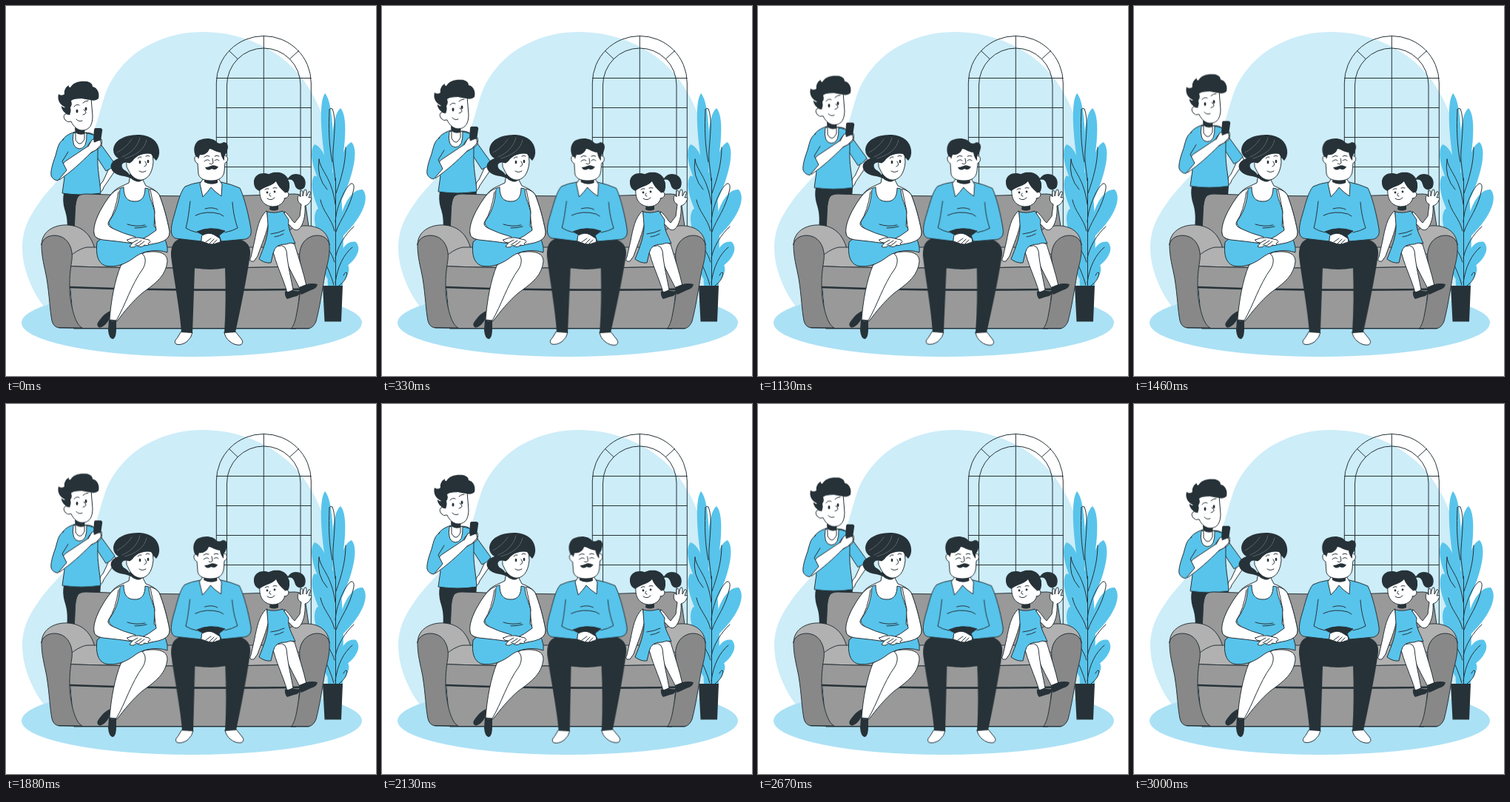
Write an HTML page that moves like this. It is 500 px wide and 500 px high and loops after 3.04 s.

```html
<!DOCTYPE html>
<html lang="en">
<head>
<meta charset="utf-8">
<title>Family on a sofa</title>
<style>
html, body { margin: 0; width: 100%; height: 100%; overflow: hidden; background: #fff; }
svg { display: block; width: 100vw; height: 100vh; }
path, ellipse, circle { stroke-linecap: round; stroke-linejoin: round; }
.ink { fill: #263238; }
.line { fill: none; stroke: #263238; stroke-width: 1; }
.skin { fill: #fff; stroke: #263238; stroke-width: 1; }
.blue { fill: #58c4eb; stroke: #263238; stroke-width: 1; }
.grey { fill: #999; stroke: #263238; stroke-width: 1; }
.dark { fill: #888; stroke: #263238; stroke-width: 1; }
.light { fill: #b1b1b1; stroke: #263238; stroke-width: 1; }
</style>
</head>
<body>
<svg viewBox="0 0 500 500">
  <path fill="#cdedf8" d="M265 35C234 35 208 44 187 56C163 70 145 93 136 114C127 137 124 161 112 184C95 214 64 238 44 267C29 288 22 305 22 326C22 353 34 385 54 410L430 412C446 350 452 240 434 170C425 134 407 98 376 73C346 49 308 35 265 35Z"/>
  <ellipse cx="251" cy="428" rx="230" ry="46" fill="#abe1f5"/>

  <path class="line" d="M284.300 305V104A64 63.500 0 0 1 412.300 104V305M298.500 305V107A49.750 50 0 0 1 398 107V305M348.300 40.500V305M284.300 97.500H412.300M284.300 137.500H412.300M284.300 177.500H412.300M284.300 217.500H412.300M301.500 60.500L313 71.500M395.500 60.500L383.500 71.500"/>

  <path fill="#fff" d="M437 142Q439 136 441 139L445 152L442 185L437 172ZM460 244Q469 235 470 247L462 262L454 262ZM452 374L460 359Q463 363 459 371L450 379Z"/>
  <g id="leaves" fill="#58c4eb">
    <path d="M437 225L451 225L456 300L455 379H435L432 300Z"/>
  </g>
  <path class="line" d="M445.500 233V379M437 140Q438 137 441 139C446 152 444 169 442 196C441 211 444 221 445 236M437 140C436 164 436 186 441 211M459 191C459 213 453 233 446 253M423 207C424 218 434 228 439 243C442 251 444 260 445 268M423 207Q419 231 434 248M445 292C446 274 456 248 466 240Q471 239 470 247C465 274 452 287 446 305M425 262C428 278 440 287 444 304M445 341C448 325 458 309 470 298M429 313C432 325 440 333 444 346M445 374C448 352 456 336 468 326M428 340C434 352 439 363 443 377M450 378Q460 371 461 361Q459 358 456 364"/>
  <path class="ink" d="M428 378H455L453 426.500H430.500Z"/>

  <g id="son">
    <path class="ink" d="M78 253H128L124 310H82C84 292 82 283 79 274Q76 263 78 253Z"/>
    <path class="skin" d="M147 214Q150 219 145 226L132 245Q130 252 126 251Q126 240 131 237L138 222Z"/>
    <path class="blue" d="M108 171Q118 171 121 177L147 213Q142 221 135 223L120 200Z"/>
    <path class="blue" d="M93 170C82 174 76 178 74 187L66 213L79 232L76 253Q102 257 128 253C127 235 123 221 124 202L124 180Q120 172 106 172Z"/>
    <path class="skin" d="M91 172Q88 192 99 193Q110 193 109 172Z"/>
    <path class="skin" d="M94 158V181Q100 192 106 180V161Z"/>
    <path class="ink" d="M93 164Q99 169 106 166V173Q98 175 94 171Z"/>
    <path class="skin" d="M87 126L86 147C79 143 76 149 80 154Q83 158 88 156C91 163 97 168 103 168C113 168 117 160 117 149L115 124Z"/>
    <path class="ink" d="M84 147C80 146 74 139 75 135Q78 138 80 137C72 133 69 126 71 119Q75 122 79 119C78 114 81 109 85 107Q84 110 87 110C91 103 99 101 110 102Q117 104 117 109C123 110 127 117 125 125Q121 129 114 127C105 126 97 122 88 128Q90 134 87 137Q89 145 84 147Z"/>
    <path class="line" d="M92 136Q95 132 99 134M104 131Q107 128 111 128M105 140Q112 145 104 147M95 153Q98 157 103 155"/>
    <ellipse class="ink" cx="96" cy="142" rx="1.500" ry="2.500"/>
    <ellipse class="ink" cx="108" cy="139" rx="1.500" ry="2.500"/>
    <path class="skin" d="M80 210L110 190Q114 181 120 181L129 180Q131 188 126 192L114 199C102 211 88 224 72 235L66 228Z"/>
    <path class="blue" d="M78 180C71 184 70 191 67 202C63 213 60 223 61 229Q63 235 70 236L82 222L76 210L84 197"/>
    <path class="ink" d="M121 165L128 165Q131 166 130 169L128 183Q127 186 124 185L119 184Q117 183 118 181L119 168Q119 165 121 165Z"/>
    <path class="skin" d="M111 190L116 181Q120 179 119 184L127 181Q130 187 126 190Q123 195 115 198"/>
  </g>

  <g id="sofa">
    <path class="grey" d="M92 300C94 283 92 267 97 258Q100 254 108 254Q250 260 390 254Q402 254 404 263L410 305V345H92Z"/>
    <path class="light" d="M48 322C49 301 70 295 84 296C100 297 114 306 120 328L84 360Z"/>
    <path class="light" d="M437 322C435 302 418 296 402 297C386 298 372 306 368 328L402 360Z"/>
    <path class="grey" d="M84 342H401L392 436H92Z"/>
    <path class="light" d="M78 351C79 341 99 327 110 326H374C388 327 404 340 405 351C350 355 130 355 78 351Z"/>
    <path class="grey" d="M78 351C130 355 350 355 405 351Q406 372 397 382C290 386 180 384 87 380Q77 373 78 351Z"/>
    <path class="line" style="stroke-width:2.500" d="M87 380C180 384 300 384 396 383"/>
    <path class="dark" d="M48 322C50 312 62 308 72 311C84 314 91 328 89 343C86 360 85 379 87 395C90 415 95 431 103 435H72Q64 434 62 425C59 410 59 393 55 368C52 352 48 340 48 322Z"/>
    <path class="dark" d="M437 322C435 312 424 308 414 311C401 315 395 328 397 343C400 362 399 380 396 397C393 415 391 431 385 436H409Q416 434 419 426C424 407 427 386 431 363C434 348 438 340 437 322Z"/>
    <path class="line" d="M72 434.500L103 435.500H409"/>
  </g>

  <g id="mother">
    <path class="skin" d="M187 333C205 330 218 333 218 345C216 367 197 378 184 388C171 399 159 414 150 426L139 424C146 395 163 354 187 333Z"/>
    <path class="skin" d="M155 351L174 334C187 330 192 343 185 355C169 377 161 405 149 425L140 424C142 397 147 371 155 351Z"/>
    <path class="ink" d="M141 412L139 424C136 430 129 436 125 434Q121 431 126 425Q133 415 141 412ZM139 424Q145 427 149 425C149 437 150 449 144 450Q139 449 138 438Z"/>
    <path class="skin" d="M168 228L166 239C154 245 147 246 140 257C128 274 118 292 119 307Q120 315 131 316L166 321L206 320Q222 316 221 305C218 288 212 267 207 255Q203 248 189 243L184 233Z"/>
    <path class="blue" d="M159 245C159 258 164 264 173 264C184 265 188 257 188 246L193 247C193 260 200 270 201 280L200 297L216 318Q219 327 218 333C204 328 186 331 176 338C163 348 150 354 134 351C124 347 121 336 123 319L145 301C139 297 138 293 140 290C151 275 153 260 154 247Z"/>
    <path class="skin" d="M152 251Q148 278 139 291Q135 297 145 301Q157 307 175 312L172 321Q152 318 131 316Q119 314 119 307C117 294 128 273 140 257Q146 249 155 246" />
    <path class="skin" d="M195 247Q204 250 207 255C212 267 218 288 221 305Q222 316 206 320L186 324L182 316Q193 311 203 303Q200 287 201 278Z"/>
    <path class="line" d="M164 295Q176 299 188 296M174 300Q182 300 190 298"/>
    <path class="skin" d="M164 316Q171 312 180 313L193 316Q197 319 192 321Q194 325 187 323Q182 328 177 323Q172 328 167 325L171 320Q164 320 164 316Z"/>
    <path class="line" d="M171 320L178 316M174 323L183 317M178 325L187 318"/>
    <path class="ink" d="M169 225L186 233Q182 239 176 237Q169 235 166 229Z"/>
    <path class="skin" d="M166 203Q160 215 165 221C169 231 177 236 184 235C194 233 198 222 199 211L198 196Z"/>
    <path class="ink" d="M145 194C147 179 163 174 181 174C197 175 206 184 207 195Q208 203 203 209Q199 206 196 200C189 198 178 201 173 207Q168 214 165 212C157 210 154 216 159 221Q166 224 169 233C161 229 151 230 146 225C139 219 140 210 152 206Q145 202 145 194Z"/>
    <path fill="none" stroke="#7b858a" stroke-width=".6" d="M157 204C169 199 178 190 181 178M161 206C177 201 187 194 190 181M150 198Q163 191 170 180"/>
    <path class="line" d="M178 206Q180 203 183 204M189 203Q192 201 194 203M188 210Q192 215 187 217M180 223Q184 226 189 223"/>
    <ellipse class="ink" cx="181" cy="211" rx="1.400" ry="2.300"/>
    <ellipse class="ink" cx="192" cy="210" rx="1.400" ry="2.300"/>
  </g>

  <g id="girl">
    <path class="ink" d="M357 228C348 224 337 226 335 236C334 246 340 251 347 250L377 247C384 247 384 238 381 235C388 233 389 238 391 244C394 250 402 249 404 244C407 234 401 227 391 227Q385 227 381 233C375 223 363 223 357 228Z"/>
    <path class="skin" d="M352 277C342 285 339 302 336 317L331 339Q327 346 335 345L340 338C345 323 353 306 355 291Z"/>
    <path class="skin" d="M377 278C384 284 386 290 390 293L397 284L399 268C393 265 394 259 395 256Q397 255 398 258L398 250Q400 248 401 251V257L403 249Q406 246 406 251L406 257L409 251Q412 250 411 254L409 259Q413 258 413 260C411 266 408 269 404 270C405 282 402 297 395 302Q390 305 384 297L374 288Z"/>
    <path class="skin" d="M365 322Q380 315 390 322C396 342 402 360 406 378L397 382C388 364 378 347 374 331Z"/>
    <path class="skin" d="M360 328Q376 318 379 331C381 353 386 371 388 384L380 387C374 367 364 347 360 328Z"/>
    <path class="ink" d="M377 385Q382 388 387 384Q391 386 398 385Q397 392 389 393L380 396Q376 392 377 385ZM396 380L406 376Q414 374 421 376Q420 382 412 384L399 390Q396 387 396 380Z"/>
    <path class="blue" d="M353 278Q363 281 374 277L382 289C380 301 387 311 391 321Q384 319 378 322Q364 321 361 334L358 347Q350 348 342 342C348 327 355 310 354 296Z"/>
    <path class="line" d="M358 308Q368 307 376 303M363 312Q370 311 375 308"/>
    <path class="ink" d="M357 268H368V275Q362 278 356 275Z"/>
    <path class="skin" d="M343 246C341 264 351 271 361 271C372 271 379 263 378 249L370 232Z"/>
    <path class="ink" d="M342 250C341 239 348 228 361 225C376 223 387 238 382 250Q380 254 377 252C372 248 367 243 365 237C360 243 350 244 342 250Z"/>
    <path class="skin" d="M377 252Q382 250 382 255Q381 260 376 260"/>
    <path class="line" d="M350 248Q352 246 355 247M361 246Q363 245 366 246M357 253Q354 257 358 257M353 260Q358 264 363 259"/>
    <circle class="ink" cx="353" cy="252" r="1.400"/>
    <circle class="ink" cx="363" cy="251" r="1.400"/>
  </g>

  <g id="father">
    <path class="skin" d="M237 440L252 441Q251 448 244 454Q236 459 230 457Q226 454 231 449ZM295 441L310 440L318 450Q322 455 317 458Q309 459 302 453Q296 448 295 441Z"/>
    <path class="ink" d="M258 305Q277 294 297 305L300 314C317 312 332 319 330 336C325 370 317 409 310 441L295 442C297 412 297 383 296 354Q277 358 255 354L252 442L237 441C235 411 227 370 223 338Q222 317 237 314L258 313Z"/>
    <path class="blue" d="M263 238Q250 240 242 244C235 251 231 271 226 287C222 302 222 311 229 314L264 318L267 310L258 305Q276 297 296 304L288 310L291 318L324 315Q333 312 331 301C328 283 322 258 316 246Q305 241 291 238Z"/>
    <path class="line" d="M249 264C247 279 246 289 243 300Q249 304 258 306M306 265C307 280 310 291 313 300Q306 304 296 306M256 283Q271 276 289 281L294 284M269 274Q279 271 286 275"/>
    <path class="skin" d="M265 310Q274 305 281 309L289 314Q291 320 286 320Q278 324 270 320L264 318Z"/>
    <path class="line" d="M270 319L277 314M275 321L281 315M280 321L285 316"/>
    <path class="skin" d="M267 233L262 240L266 258Q273 251 277 245Q282 251 291 257L292 241L287 233Z"/>
    <path class="ink" d="M268 231H286V239Q277 243 268 238Z"/>
    <path class="skin" d="M259 203C254 200 253 210 259 213L260 227C262 235 271 236 278 236C289 236 294 231 295 223L296 212C301 211 300 201 296 203L292 190H262Z"/>
    <path class="ink" d="M260 207Q259 203 257 204C252 196 254 184 262 181C271 177 282 179 286 185Q290 187 294 184C300 184 301 190 299 195Q298 200 295 202L295 209Q291 205 290 198C282 197 279 193 275 193C273 199 267 202 262 201Z"/>
    <path class="line" d="M268 204Q271 201 275 203M282 203Q285 201 288 203M268 210Q272 206 275 209M282 209Q285 206 288 209M279 206L280 212Q278 215 275 213"/>
    <path class="ink" d="M277 216C281 214 284 217 287 217Q284 223 278 220Q272 224 269 218Q273 218 277 216Z"/>
  </g>
</svg>
<script>
const LOOP = 3040;

// Teardrop from a point on the stem to a rounded tip, w = half width.
function leaf(x, y, tipX, tipY, w) {
  const dx = tipX - x, dy = tipY - y, len = Math.hypot(dx, dy);
  const nx = -dy / len * w, ny = dx / len * w;
  const at = (along, side) => `${x + dx * along + nx * side} ${y + dy * along + ny * side}`;
  const path = document.createElementNS("http://www.w3.org/2000/svg", "path");
  path.setAttribute("d", `M${at(0, 0)}C${at(.4, 1.1)} ${at(.9, 1.4)} ${at(1, 0)}C${at(.9, -1.4)} ${at(.4, -1.1)} ${at(0, 0)}Z`);
  document.getElementById("leaves").append(path);
}

[
  [439, 250, 431, 118, 8], [445, 250, 452, 138, 9],
  [440, 268, 417, 187, 10], [447, 275, 467, 184, 10],
  [443, 312, 417, 229, 10], [447, 318, 482, 248, 13],
  [443, 350, 421, 274, 10], [447, 360, 473, 319, 11],
  [442, 379, 422, 317, 9], [449, 379, 460, 348, 7],
].forEach(args => leaf(...args));

function loop(id, steps) {
  const el = document.getElementById(id);
  const frames = steps.map(([offset, transform]) => ({ offset, transform }));
  el.animate(frames, { duration: LOOP, iterations: Infinity, easing: "linear" });
  return el;
}

loop("son", [[0, "translateY(0)"], [.5, "translateY(-10px)"], [1, "translateY(0)"]]);
loop("father", [[0, "rotate(0deg)"], [.25, "rotate(1deg)"], [.75, "rotate(-1deg)"], [1, "rotate(0deg)"]])
  .style.transformOrigin = "277px 318px";
</script>
</body>
</html>
```
